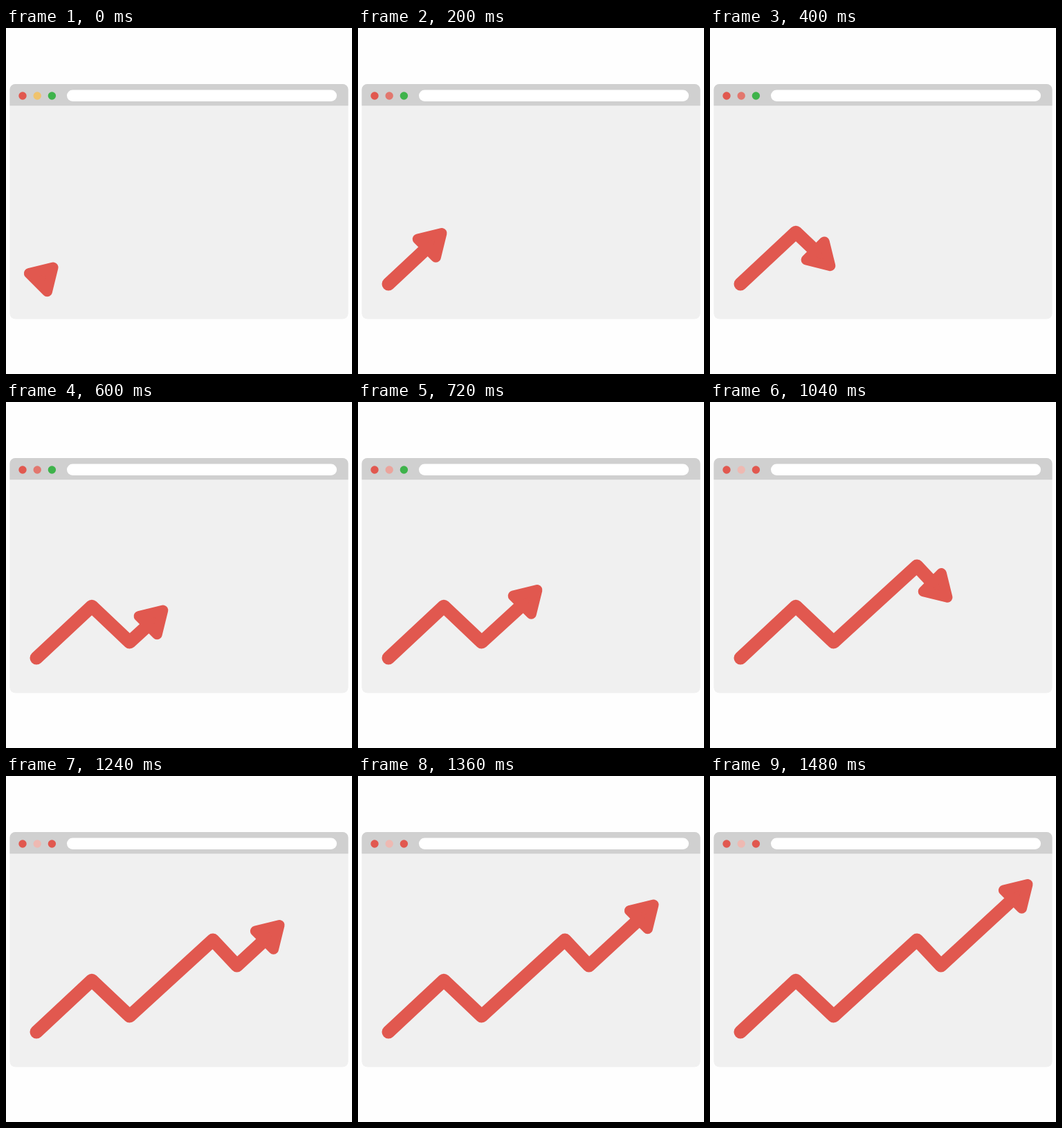
An HTML page for the animation above (3020 ms loop, 500 by 500 pixels).

```html
<!DOCTYPE html>
<html lang="en">
<head>
<meta charset="utf-8">
<title>Rising chart</title>
<style>
  html, body { margin: 0; width: 100%; height: 100%; overflow: hidden; background: #fefefe; }
  svg { display: block; width: 100%; height: 100%; }
  .red { fill: #e1584f; stroke: #e1584f; stroke-linejoin: round; stroke-linecap: round; }
</style>
</head>
<body>
<svg viewBox="0 0 500 500">
  <rect x="5.5" y="81" width="489" height="339.5" rx="8" fill="#f0f0f0"/>
  <path d="M5.5 112.3V89a8 8 0 0 1 8-8H486.5a8 8 0 0 1 8 8V112.3Z" fill="#d0d0d0"/>
  <circle cx="24" cy="98" r="5.7" fill="#e1584f"/>
  <circle id="middle" cx="45.2" cy="98" r="5.7"/>
  <circle id="right" cx="66.4" cy="98" r="5.7"/>
  <rect x="88" y="89.5" width="390" height="16.5" rx="8.25" fill="#fff"/>
  <path id="line" class="red" style="fill:none" stroke-width="19"
        d="M44 370L124 295.2L178.7 347L299 237L333.7 274L435 180.5"/>
  <path id="arrow" class="red" stroke-width="15" d="M34 0L3.4 -18.5V18.5Z"/>
</svg>
<script>
  const LOOP = 3020, DRAW = 1480, STEP = 20;
  const [line, arrow, middle, right] =
    ["line", "arrow", "middle", "right"].map(id => document.getElementById(id));
  const total = line.getTotalLength();

  const middleColor = t =>
    t < 200 ? "#efc36d" : t < 720 ? "#e2776e" : t < 940 ? "#eba49c" : "#eeb9b2";

  function render(t) {
    const d = total * Math.min(t / DRAW, 1);
    const p = line.getPointAtLength(d);
    // Heading flips sharply at each corner
    const a = line.getPointAtLength(Math.max(0, d - 0.2));
    const b = line.getPointAtLength(Math.max(0.2, d));
    const angle = b.y > a.y ? 45 : -45;

    line.style.visibility = d ? "visible" : "hidden";
    line.setAttribute("stroke-dasharray", `${d} ${total + 50}`);
    arrow.setAttribute("transform", `translate(${p.x} ${p.y}) rotate(${angle})`);
    middle.setAttribute("fill", middleColor(t));
    right.setAttribute("fill", t < 940 ? "#3eb34b" : "#e1584f");
  }

  const start = performance.now();
  function tick(now) {
    const t = Math.max(0, now - start) % LOOP;
    render(Math.floor(t / STEP) * STEP);
    requestAnimationFrame(tick);
  }
  render(0);
  requestAnimationFrame(tick);
</script>
</body>
</html>
```
